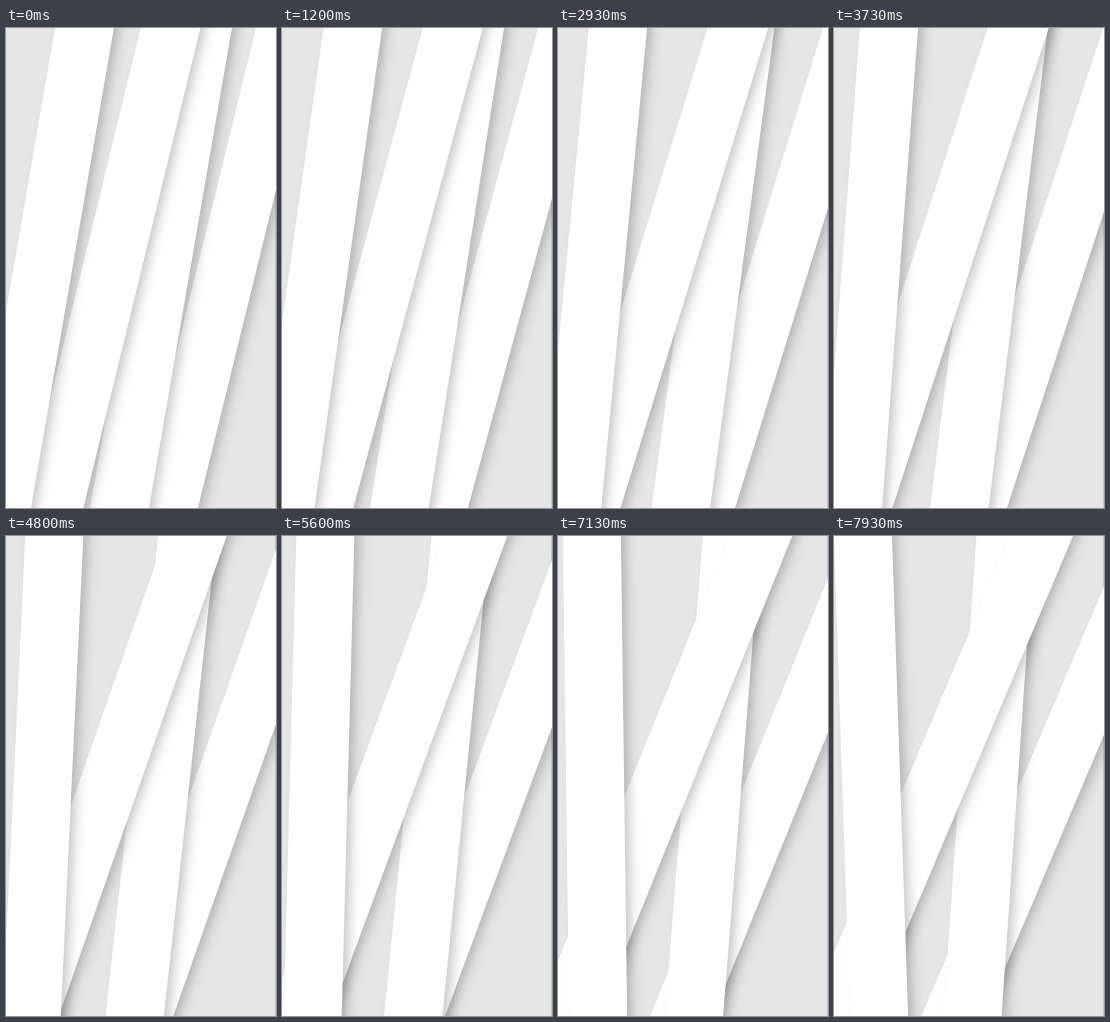
Write an HTML page that moves like this. It is 270x480 px and loops after 8 s.

```html
<!DOCTYPE html>
<html lang="en">
<head>
<meta charset="utf-8">
<title>Turning strips</title>
<style>
  html, body {
    margin: 0;
    width: 100%;
    height: 100%;
    overflow: hidden;
  }

  .stage {
    position: relative;
    width: 270px;
    height: 480px;
    overflow: hidden;
    background: linear-gradient(#c6c6c6, #c6c6c6) right / 1px 100% no-repeat #e6e6e6;
  }

  .strip {
    --width: 58.4px;
    position: absolute;
    left: calc(var(--x) - var(--width) / 2);
    top: -120px;
    width: var(--width);
    height: 720px;
    background: #fff;
    box-shadow: 7px 0 12px -3px rgba(0, 0, 0, .25);
    animation: turn 8s linear infinite;
  }

  @keyframes turn {
    from { transform: rotate(var(--from)); }
    to   { transform: rotate(var(--to)); }
  }
</style>
</head>
<body>
<!-- Back to front: each strip casts its shadow on the one to its right. -->
<div class="stage">
  <div class="strip" style="--x: 221.3px; --from: 13.8deg; --to: 23.1deg"></div>
  <div class="strip" style="--x: 155.2px; --from: 9.8deg; --to: 3.88deg"></div>
  <div class="strip" style="--x: 105.9px; --from: 13.7deg; --to: 23deg"></div>
  <div class="strip" style="--x: 37.3px; --from: 9.8deg; --to: -2.03deg"></div>
</div>
</body>
</html>
```
